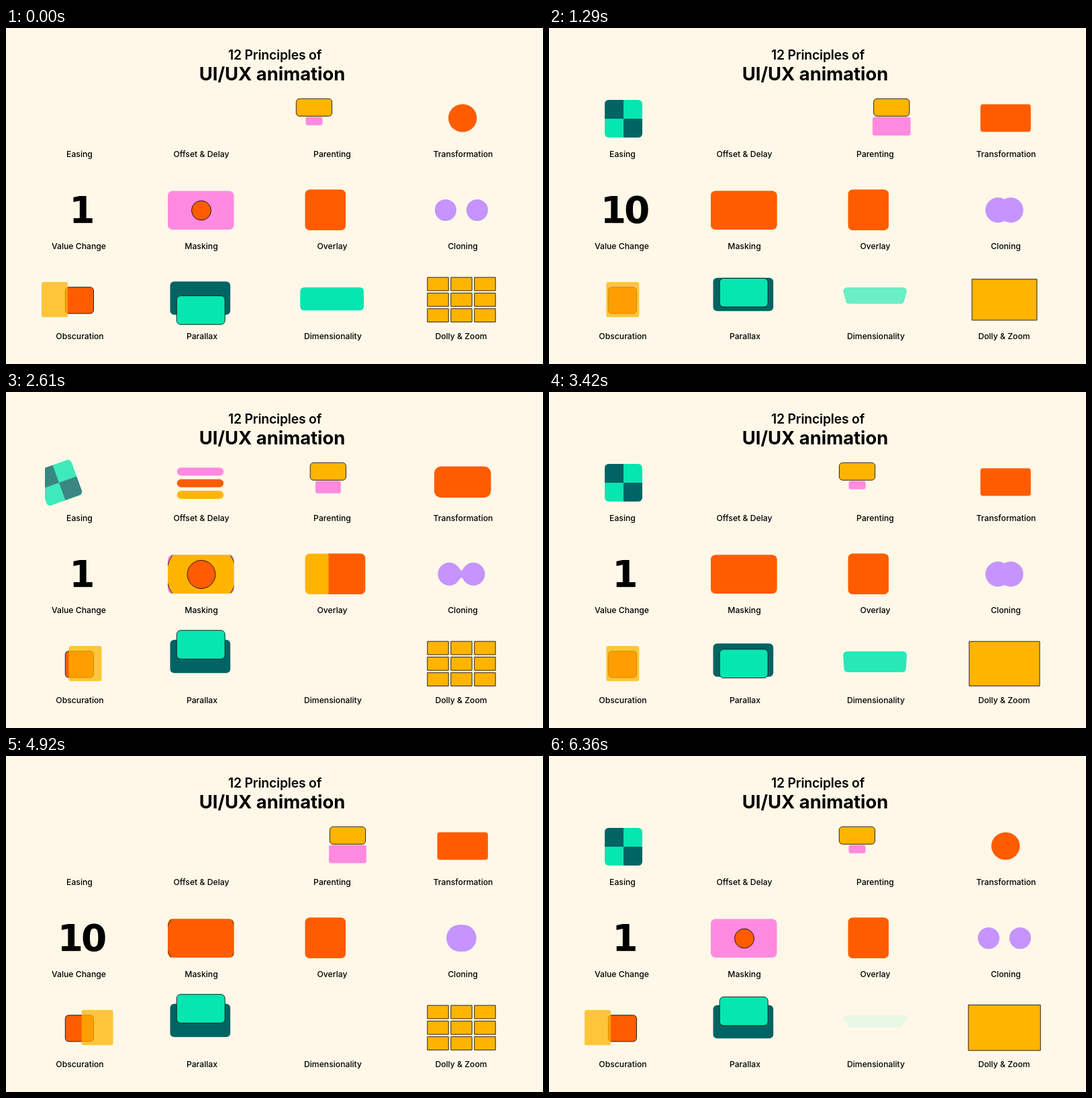
Recreate the animation shown at these times as an HTML page. Size 800 px wide and 500 px high, loop 6.39 s.

```html
<!DOCTYPE html>
<html lang="en">
<head>
<meta charset="utf-8">
<title>12 Principles of UI/UX animation</title>
<style>
  html, body { margin: 0; width: 100%; height: 100%; overflow: hidden; background: #fff8e8; }
  svg { display: block; width: 800px; height: 500px; }
  text { text-anchor: middle; font-family: Inter, "Open Sans", sans-serif; }
  .top { font-size: 19.4px; font-weight: 600; letter-spacing: -.2px; }
  .main { font-size: 27.4px; font-weight: 700; }
  .labels text { font-size: 12.2px; font-weight: 500; }
  #count { font: bold 55px "DejaVu Sans", sans-serif; letter-spacing: -3px; }
  .orange { fill: #ff5c00; }
  .yellow { fill: #ffb400; }
  .pink { fill: #ff8ae0; }
  .purple { fill: #c594ff; }
  .mint { fill: #05e6b0; }
  .teal { fill: #006464; }
  .line { stroke: #111; stroke-width: .9; vector-effect: non-scaling-stroke; }
</style>
</head>
<body>
<svg viewBox="0 0 800 500">
  <defs>
    <clipPath id="easeClip"><rect x="58" y="95" width="104" height="80"/></clipPath>
    <clipPath id="tileClip"><rect x="-28" y="-28" width="56" height="56" rx="6"/></clipPath>
    <clipPath id="maskClip"><rect x="241" y="242.5" width="98.5" height="57.5" rx="7"/></clipPath>
    <clipPath id="cardClip"><rect id="card" x="445.5" y="240.5" height="60.5" rx="7"/></clipPath>
    <clipPath id="veilClip"><rect x="53" y="378" width="106.5" height="52.5" rx="3"/></clipPath>
    <clipPath id="gridClip"><rect x="621.5" y="368" width="114" height="72"/></clipPath>
  </defs>

  <text class="top" x="400.5" y="47">12 Principles of</text>
  <text class="main" x="396.5" y="78">UI/UX animation</text>
  <g class="labels" id="labels"></g>

  <g clip-path="url(#easeClip)"><g id="tile"><g clip-path="url(#tileClip)">
    <rect class="mint" x="-28" y="-28" width="56" height="56"/>
    <path class="teal" d="M-28-28H0V28H28V0H-28Z"/>
  </g></g></g>

  <g id="bars">
    <rect class="pink" y="112.5" height="12" rx="6"/>
    <rect class="orange" y="129.7" height="12" rx="6"/>
    <rect class="yellow" y="147" height="12" rx="6"/>
  </g>

  <rect id="child" class="pink" y="132.5" rx="3"/>
  <rect id="parent" class="yellow line" y="105.2" width="53.3" height="26" rx="5"/>

  <rect id="morph" class="orange"/>

  <text id="count" x="112" y="290">1</text>

  <g clip-path="url(#maskClip)">
    <rect class="pink" x="241" y="242" width="99" height="59"/>
    <circle id="ring" class="yellow line" cx="291" cy="271.5"/>
    <circle id="dot" class="orange line" cx="291" cy="271.5"/>
  </g>

  <g clip-path="url(#cardClip)">
    <rect class="yellow" x="445" y="240" width="91" height="62"/>
    <rect id="over" class="orange" y="240" width="100" height="62"/>
  </g>

  <g class="purple">
    <circle id="left" cy="271"/><circle id="right" cy="271"/><path id="neck"/>
  </g>

  <rect class="orange line" x="88.3" y="385.7" width="42.2" height="39.2" rx="5"/>
  <g clip-path="url(#veilClip)">
    <rect id="veil" class="yellow" y="378" width="49" height="52.5" rx="3" opacity=".75"/>
  </g>

  <rect id="back" class="teal" x="244.5" width="89.7" height="49.5" rx="6"/>
  <rect id="front" class="mint line" x="254.2" width="72" height="42.7" rx="6"/>

  <path id="flap" class="mint"/>

  <g clip-path="url(#gridClip)"><g id="grid"></g></g>
</svg>

<script>
const LOOP = 6390, STEP = 30;
const $ = id => document.getElementById(id);
const set = (el, attrs) => { for (const k in attrs) el.setAttribute(k, attrs[k]); };
const clamp = v => Math.min(1, Math.max(0, v));
const cubic = u => u < .5 ? 4 * u ** 3 : 1 - 4 * (1 - u) ** 3;
const ramp = (t, from, span) => cubic(clamp((t - from) / span));

// Smooth monotone curve through time, value pairs.
function track(t, ...k) {
  const n = k.length / 2, x = i => k[2 * i], y = i => k[2 * i + 1];
  if (t >= x(n - 1)) return y(n - 1);
  const slope = i => (y(i + 1) - y(i)) / (x(i + 1) - x(i));
  const tangent = i => {
    if (i < 1 || i > n - 2) return 0;
    const a = slope(i - 1), b = slope(i);
    return a * b > 0 ? 2 * a * b / (a + b) : 0;
  };
  let i = 0;
  while (t >= x(i + 1)) i++;
  const h = x(i + 1) - x(i), u = (t - x(i)) / h, e = u * u * (3 - 2 * u);
  return y(i) + (y(i + 1) - y(i)) * e
    + h * u * (1 - u) * ((1 - u) * tangent(i) - u * tangent(i + 1));
}

const rows = [
  [192, "Easing", 109.5, "Offset & Delay", 291, "Parenting", 486, "Transformation", 681],
  [328.5, "Value Change", 108.5, "Masking", 291, "Overlay", 486, "Cloning", 680.5],
  [463, "Obscuration", 110, "Parallax", 292, "Dimensionality", 487, "Dolly & Zoom", 678]
];
function add(parent, name, attrs, text = "") {
  const el = document.createElementNS("http://www.w3.org/2000/svg", name);
  set(el, attrs);
  el.textContent = text;
  parent.append(el);
}
for (const [y, ...items] of rows)
  for (let i = 0; i < items.length; i += 2)
    add($("labels"), "text", { x: items[i + 1], y }, items[i]);
for (let i = 0; i < 9; i++)
  add($("grid"), "rect", {
    class: "yellow line", width: 31.4, height: 19.8,
    x: (i % 3 - 1) * 35 - 15.7, y: (Math.floor(i / 3) - 1) * 23.3 - 9.9
  });

function easing(t) {
  const dx = track(t, 0, -52, 110, -32, 420, 0, 1690, 0, 1740, 3.5, 1760, 9, 1960, 54);
  const turn = dx < 0 ? dx * .62 : dx;
  const opacity = track(t, 0, 0, 110, .77, 250, 1, 1690, 1, 1740, .93, 1760, .88, 1960, 0);
  set($("tile"), { transform: `translate(${111 + dx} 135) rotate(${turn})`, opacity });
}

function offset(t) {
  [...$("bars").children].forEach((bar, i) => {
    const end = 69.5 * ramp(t, 290 + 70 * i, 230);
    const start = 69.5 * ramp(t, 825 + 25 * i, 110);
    set(bar, { x: 254.7 + start, width: end - start });
  });
}

function parenting(t) {
  const x = track(t, 0, 432.3, 460, 432.3, 750, 471.8, 1310, 484, 1525, 487,
    1740, 486.3, 2610, 453.2, 2690, 445.2, 2850, 432.3);
  const width = 25 + (x - 432.3) * .615;
  set($("parent"), { x });
  set($("child"), { x: x + 26.7 - width / 2, width, height: width * .485 });
}

function transformation(t) {
  const width = track(t, 0, 42.5, 250, 42.5, 420, 89, 480, 84.5, 640, 75.5,
    1380, 75, 1740, 49, 1880, 42.5);
  const height = track(t, 0, 41.5, 250, 41.5, 420, 48, 480, 46.5, 640, 41);
  const rx = track(t, 0, 21.25, 250, 21.25, 480, 10, 660, 4, 1380, 4, 1740, 24.5, 1880, 21.25);
  set($("morph"), {
    x: 680.2 - width / 2, y: 134 - height / 2, width, height, rx, ry: Math.min(rx, height / 2)
  });
}

function counting(t) {
  $("count").textContent = 1 + Math.floor(9 * (ramp(t, 560, 230) - ramp(t, 2405, 230)) + 1e-6);
}

function masking(t) {
  set($("ring"), { r: track(t, 0, 14, 180, 14, 480, 52, 680, 72, 1330, 72, 1740, 31.5, 1960, 14) });
  set($("dot"), { r: track(t, 0, 14.5, 250, 14.5, 480, 21, 740, 62, 1380, 62, 1740, 17, 1900, 14.5) });
}

function overlay(t) {
  const shift = track(t, 0, 0, 100, 0, 270, 20.5, 680, 31, 750, 35, 820, 35, 980, 0);
  set($("card"), { width: Math.min(60.5 + shift, 89.7) });
  set($("over"), { x: 445.5 + shift });
}

function cloning(t) {
  const half = track(t, 0, 23.5, 300, 23.5, 480, 18, 720, 0, 1140, 0, 1380, 16.5, 1560, 23.5);
  const r = 20.5 - half * .187, cx = 678.4, a = cx - half, b = cx + half;
  set($("left"), { cx: a, r });
  set($("right"), { cx: b, r });
  const dx = r * .77, dy = r * .64;
  const neck = half > 8 && half < 20
    ? `M${a + dx} ${271 - dy}Q${cx} 271 ${b - dx} ${271 - dy}V${271 + dy}Q${cx} 271 ${a + dx} ${271 + dy}Z`
    : "";
  set($("neck"), { d: neck });
}

function obscuration(t) {
  set($("veil"), {
    x: track(t, 0, 43, 200, 43, 480, 93.5, 750, 117.5, 960, 121, 1380, 74.5, 1740, 44, 1850, 43)
  });
}

function parallax(t) {
  set($("front"), {
    y: track(t, 0, 398.5, 60, 398, 140, 369.2, 180, 358.5, 250, 354.7, 1100, 354.7, 1520, 398, 1570, 398.5)
  });
  set($("back"), { y: track(t, 0, 377.3, 140, 376.3, 180, 370.8, 240, 368.7, 1150, 368.7, 1500, 377.3) });
}

function dimension(t) {
  const h = track(t, 0, 34.3, 140, 22, 180, 18, 260, 8, 1080, 8, 1440, 34.3);
  const opacity = track(t, 0, 1, 140, .28, 180, .09, 230, 0, 1100, 0, 1440, 1);
  const inset = (34.3 - h) * .35, r = Math.min(6, h / 3);
  const l = 438.3, right = 533, y = 386, low = y + h, bl = l + inset, br = right - inset;
  set($("flap"), {
    opacity,
    d: `M${l + r} ${y}H${right - r}Q${right} ${y} ${right} ${y + r}L${br} ${low - r}`
      + `Q${br} ${low} ${br - r} ${low}H${bl + r}Q${bl} ${low} ${bl} ${low - r}L${l} ${y + r}Q${l} ${y} ${l + r} ${y}Z`
  });
}

function dolly(t) {
  const s = 1 + 2.42 * (ramp(t, 0, 860) - ramp(t, 1009, 860));
  set($("grid"), { transform: `translate(678.5 404.3) scale(${s})` });
}

// Each scene repeats on its own period inside the main loop.
const scenes = [
  [easing, 2500], [offset, 1790], [parenting, 2950], [transformation, 2130],
  [counting, 3195], [masking, 2130], [overlay, 1790], [cloning, 2130],
  [obscuration, 2130], [parallax, 2060], [dimension, 2060], [dolly, 2730]
];

const begin = performance.now();
function frame(now) {
  const t = Math.floor(Math.max(0, now - begin) % LOOP / STEP) * STEP;
  for (const [draw, period] of scenes) draw(t % period);
  requestAnimationFrame(frame);
}
frame(begin);
</script>
</body>
</html>
```
